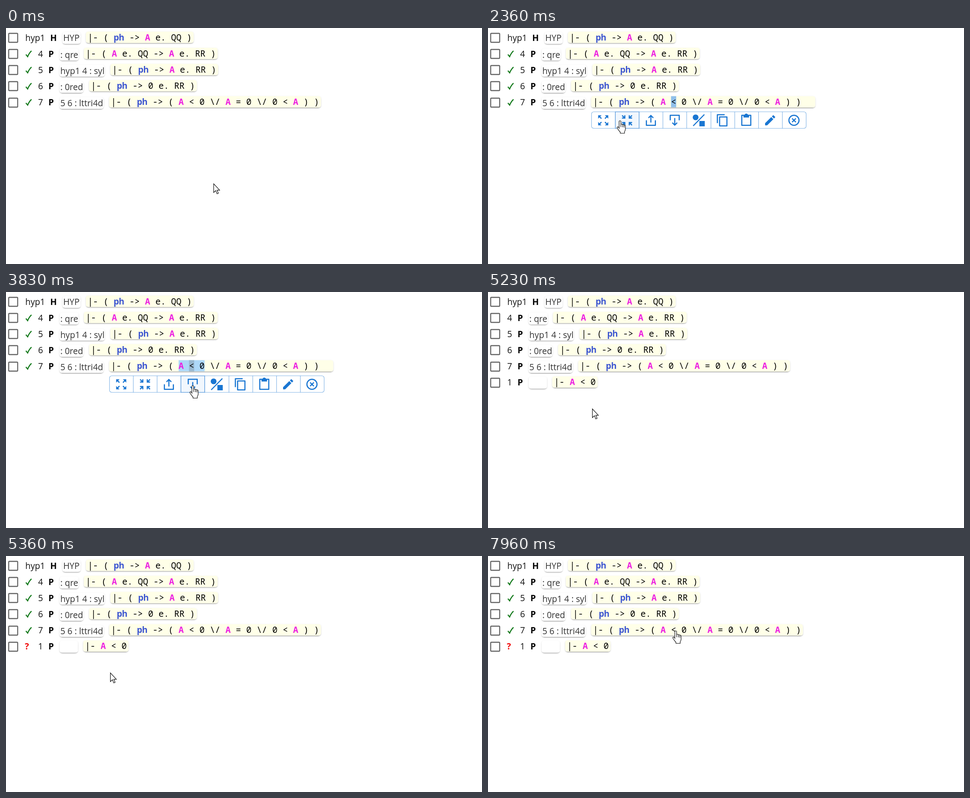
Write an HTML page with a canvas that moves like this. It is 1060x528 px and loops after 8 s.

```html
<!DOCTYPE html>
<html lang="en">
<head>
<meta charset="utf-8">
<title>Proof editor</title>
<style>
html, body { margin: 0; width: 100%; height: 100%; overflow: hidden; background: #fff; }
canvas { display: block; }
</style>
</head>
<body>
<canvas id="stage" width="1060" height="528"></canvas>
<script>
const ctx = document.getElementById('stage').getContext('2d');
const W = 1060, H = 528, LOOP = 8000, STEP = 1000 / 15;
const PITCH = 11.59, BLUE = '#1976d2', INK = '#111';
const SANS = '19.1px "Open Sans", "Noto Sans", sans-serif';
const MONO = '19.32px "Noto Sans Mono", monospace';
const OUTDENT = 28.8;

// Moments of the hard changes
const MENU_OPEN = 1830, SELECTION_GROWS = 2700, STEP_ADDED = 3900;
const DIALOG_OPEN = 5300, UNIFIED = 5360;

const rows = [
  { id: 'hyp1', kind: 'H', label: 'HYP', labelX: 126, labelW: 40, x: 178, formula: '|- ( ph -> A e. QQ )' },
  { id: '4', kind: 'P', label: ': qre', labelX: 119.5, labelW: 42, x: 173.5, formula: '|- ( A e. QQ -> A e. RR )' },
  { id: '5', kind: 'P', label: 'hyp1 4 : syl', labelX: 119.5, labelW: 100, x: 232.5, formula: '|- ( ph -> A e. RR )' },
  { id: '6', kind: 'P', label: ': 0red', labelX: 119.5, labelW: 52.5, x: 185, formula: '|- ( ph -> 0 e. RR )' },
  { id: '7', kind: 'P', label: '5 6 : lttri4d', labelX: 119.5, labelW: 97.5, x: 229.7, formula: '|- ( ph -> ( A < 0 \\/ A = 0 \\/ 0 < A ) )' },
  { id: '1', kind: 'P', label: '', labelX: 119.5, labelW: 40.5, x: 172, formula: '|- A < 0' }
];

// Shadows as [offset, blur, spread, alpha]
const LOW = [[2.5, 1.25, -1.25, .2], [1.25, 1.25, 0, .14], [1.25, 3.75, 0, .12]];
const HIGH = [[13.75, 18.75, -8.75, .2], [30, 47.5, 3.75, .14], [11.25, 57.5, 10, .12]];

// Pointer keys as [time, x, y]
const moves = [
  [433, 462, 348], [1300, 415, 184], [1633, 412, 165.5], [2033, 412, 165.5],
  [2360, 294, 207], [2560, 262, 209], [2900, 258, 211], [2960, 258, 211],
  [3760, 415, 209], [3830, 416, 209], [4160, 370, 251], [4500, 370, 251],
  [5230, 232, 261], [7165, 232, 261], [7600, 428, 174], [7760, 421, 168],
  [7840, 421, 168], [7960, 417.5, 167]
];

const UP_ARROW = 'M17 7l-1.41 1.41L13 5.83V16h-2V5.83L8.41 8.41 7 7l5-5z', TRAY = 'M4 12V21H20V12';
const icons = [
  { fill: 'M15 3l2.3 2.3-2.89 2.87 1.42 1.42L18.7 6.7 21 9V3z', turns: 4 },
  { fill: 'M21 9V7h-2.59l3.09-3.09-1.41-1.41L17 5.59V3h-2v6z', turns: 4 },
  { fill: UP_ARROW, stroke: TRAY },
  { fill: UP_ARROW, stroke: TRAY, flip: true },
  { fill: 'M1.5 6.7a5.2 5.2 0 0 1 10.4 0a5.2 5.2 0 0 1-10.4 0zM13.4 13.2h9.6v9.6h-9.6z', stroke: 'M22.3 1.6L2.4 22' },
  { stroke: 'M3 17V2H16M7 6H20V22H7z' },
  { fill: 'M7 3h10v4H7z', stroke: 'M4 3H20V21H4zM10 3a2 2 0 0 1 4 0' },
  { fill: 'M3 17.25V21h3.75L17.81 9.94l-3.75-3.75zM20.71 7.04q.7-.7 0-1.41l-2.34-2.34q-.7-.7-1.41 0l-1.83 1.83 3.75 3.75z' },
  { stroke: 'M3 12a9 9 0 0 1 18 0a9 9 0 0 1-18 0M8.7 8.7l6.6 6.6M15.3 8.7l-6.6 6.6' }
];
for (const icon of icons) {
  icon.fill = icon.fill && new Path2D(icon.fill);
  icon.stroke = icon.stroke && new Path2D(icon.stroke);
}

const arrow = new Path2D('M.5 .5V20L5 15.8 8 23 11 21.7 8 14.8H13.8z');
const hand = new Path2D('M5 17V2.5Q5 .5 7 .5T9 2.5V9.5Q9 8 11 8T13 10.5Q13 9 14.6 9T16.2 11.5Q16.2 10 17.5 10T19 12.5V19Q19 22 17 25V28.5H7.5V26Q3 21 .8 17Q0 14.5 2 14.2 4 14.5 5 17z');
const knuckles = new Path2D('M9 9.5V14.5M13 10.5V15M16.2 11.5V15.5');

function text(str, x, y, font, color) {
  ctx.font = font;
  ctx.fillStyle = color;
  ctx.fillText(str, x, y);
}

function roundRect(x, y, w, h, r) {
  ctx.beginPath();
  ctx.roundRect(x, y, w, h, r);
}

// The shadow stays outside the box, so a translucent box is not darkened by it
function paper(x, y, w, h, color, shadows) {
  const away = 3000;
  ctx.save();
  roundRect(x, y, w, h, 5);
  ctx.rect(-away, 0, 2 * away, H);
  ctx.clip('evenodd');
  for (const [dy, blur, spread, alpha] of shadows) {
    ctx.shadowColor = `rgba(0,0,0,${alpha})`;
    ctx.shadowBlur = blur;
    ctx.shadowOffsetX = away;
    ctx.shadowOffsetY = dy;
    ctx.fillStyle = '#000';
    roundRect(x - spread - away, y - spread, w + 2 * spread, h + 2 * spread, 5);
    ctx.fill();
  }
  ctx.restore();
  ctx.fillStyle = color;
  roundRect(x, y, w, h, 5);
  ctx.fill();
}

function drawIcon(icon, cx, cy, color) {
  ctx.save();
  ctx.translate(cx, cy);
  ctx.scale(1.25, 1.25);
  if (icon.flip) ctx.rotate(Math.PI);
  ctx.fillStyle = ctx.strokeStyle = color;
  ctx.lineWidth = 2;
  ctx.lineJoin = 'round';
  for (let i = 0; i < (icon.turns || 1); i++) {
    ctx.save();
    ctx.rotate(i * Math.PI / 2);
    ctx.translate(-12, -12);
    if (icon.fill) ctx.fill(icon.fill);
    if (icon.stroke) ctx.stroke(icon.stroke);
    ctx.restore();
  }
  ctx.restore();
}

function drawFormula(formula, x, y) {
  for (const { 0: token, index } of formula.matchAll(/\S+/g)) {
    const color = token === 'A' ? '#ec1fe0' : token === 'ph' ? '#3c55d0' : '#000';
    const weight = /^(A|ph)$/.test(token) ? 'bold ' : '';
    text(token, x + index * PITCH, y, weight + MONO, color);
  }
}

function drawStatus(row, cy) {
  if (row.id === '1') {
    text('?', 42, cy + 6.8, 'bold ' + SANS, '#f00505');
    return;
  }
  ctx.strokeStyle = '#147a1c';
  ctx.lineWidth = 2.4;
  ctx.beginPath();
  ctx.moveTo(44.3, cy + 1.2);
  ctx.lineTo(48.2, cy + 6);
  ctx.quadraticCurveTo(51.5, cy - 2, 56.8, cy - 7);
  ctx.stroke();
}

function drawSelection(x, top, t) {
  const mark = (from, count, color) => {
    ctx.fillStyle = color;
    ctx.fillRect(x + from * PITCH, top, count * PITCH, 25);
  };
  const grown = t >= SELECTION_GROWS;
  if (grown) mark(13, 5, '#add8f8');
  mark(15, 1, grown ? '#98b8d0' : '#90c0ea');
}

function drawRow(row, i, t, checked, menu) {
  const cy = 22 + i * 36.13;
  const isStep = row.kind === 'P';
  const shift = isStep && !checked ? -OUTDENT : 0;

  ctx.strokeStyle = '#666';
  ctx.lineWidth = 2.3;
  roundRect(6, Math.round(cy) - 10, 20, 20, 1.5);
  ctx.stroke();

  if (isStep && checked) drawStatus(row, cy);
  text(row.id, isStep ? 71.5 + shift : 43, cy + 6.8, SANS, INK);
  text(row.kind, isStep ? 94.5 + shift : 98.5, cy + 6.8, 'bold ' + SANS, '#000');

  const drop = row.label && isStep ? 1 : 0;
  paper(row.labelX + shift, cy - 13 + drop, row.labelW, 26.5, '#fff', LOW);
  text(row.label, row.labelX + 1.4 + shift, cy + 7.4 + drop, SANS, '#333');

  const active = menu && row.id === '7';
  const x = row.x + shift;
  paper(x, cy - 14, active ? 499 : row.formula.length * PITCH + 8, 25.4, '#ffffe8', LOW);
  if (active) drawSelection(x + 4, cy - 14, t);
  drawFormula(row.formula, x + 4, cy + 5.6);
}

function drawMenu(pointer) {
  const left = 230.5, top = 187.5, width = 53.1, height = 37;
  const over = pointer.y > 187 && pointer.y < 225 ? Math.floor((pointer.x - left) / width) : -1;
  const edge = i => Math.floor(left + i * width) + .5;
  ctx.lineWidth = 1.2;
  ctx.strokeStyle = 'rgba(25,118,210,.5)';
  roundRect(left, top, edge(icons.length) - left, height, 5);
  ctx.stroke();
  icons.forEach((icon, i) => {
    const x = edge(i);
    if (i) {
      ctx.beginPath();
      ctx.moveTo(x, top);
      ctx.lineTo(x, top + height);
      ctx.stroke();
    }
    if (i === over) {
      ctx.fillStyle = 'rgba(25,118,210,.06)';
      ctx.fillRect(x, top, width, height);
      ctx.strokeRect(x, top, edge(i + 1) - x, height);
    }
    drawIcon(icon, left - .5 + (i + .5) * width, 206.5, BLUE);
  });
}

function drawDialog() {
  ctx.fillStyle = 'rgba(0,0,0,.09)';
  ctx.fillRect(0, 0, W, H);
  ctx.save();
  ctx.globalAlpha = .18;
  paper(743, 291, 231, 62, '#fff', HIGH);
  text('Unifying all: 80%', 762, 330, SANS, '#222');
  drawIcon(icons[8], 943, 322.5, '#666');
  ctx.restore();
}

function pointerAt(t) {
  const next = moves.findIndex(m => m[0] > t);
  if (next < 1) {
    const [, x, y] = moves[next ? moves.length - 1 : 0];
    return { x, y };
  }
  const [t0, x0, y0] = moves[next - 1], [t1, x1, y1] = moves[next];
  const u = (t - t0) / (t1 - t0), e = u * u * (3 - 2 * u);
  return { x: x0 + (x1 - x0) * e, y: y0 + (y1 - y0) * e };
}

function drawPointer({ x, y }, menu) {
  const overFormula = x > 230 && x < 701 && y > 153 && y < 178;
  const overMenu = menu && x > 230 && x < 708 && y > 187 && y < 225;
  const isHand = overFormula || overMenu;
  ctx.save();
  ctx.translate(Math.round(isHand ? x - 7 : x), Math.round(y));
  ctx.fillStyle = '#fff';
  ctx.strokeStyle = '#111';
  ctx.lineWidth = 1.2;
  const shape = isHand ? hand : arrow;
  ctx.fill(shape);
  ctx.stroke(shape);
  if (isHand) ctx.stroke(knuckles);
  ctx.restore();
}

function draw(t) {
  const menu = t >= MENU_OPEN && t < STEP_ADDED;
  const checked = t < STEP_ADDED || t >= UNIFIED;
  // The pointer is sampled fifteen times a second
  const sampled = STEP * (Math.floor((t - 25) / STEP) + .5);
  const pointer = pointerAt(sampled);

  ctx.fillStyle = '#fff';
  ctx.fillRect(0, 0, W, H);
  const shown = t < STEP_ADDED ? rows.slice(0, 5) : rows;
  shown.forEach((row, i) => drawRow(row, i, t, checked, menu));
  if (menu) drawMenu(pointer);
  if (t >= DIALOG_OPEN && t < UNIFIED) drawDialog();
  drawPointer(pointer, menu);
}

const start = performance.now();
function tick() {
  draw((performance.now() - start) % LOOP);
  requestAnimationFrame(tick);
}
tick();
</script>
</body>
</html>
```
